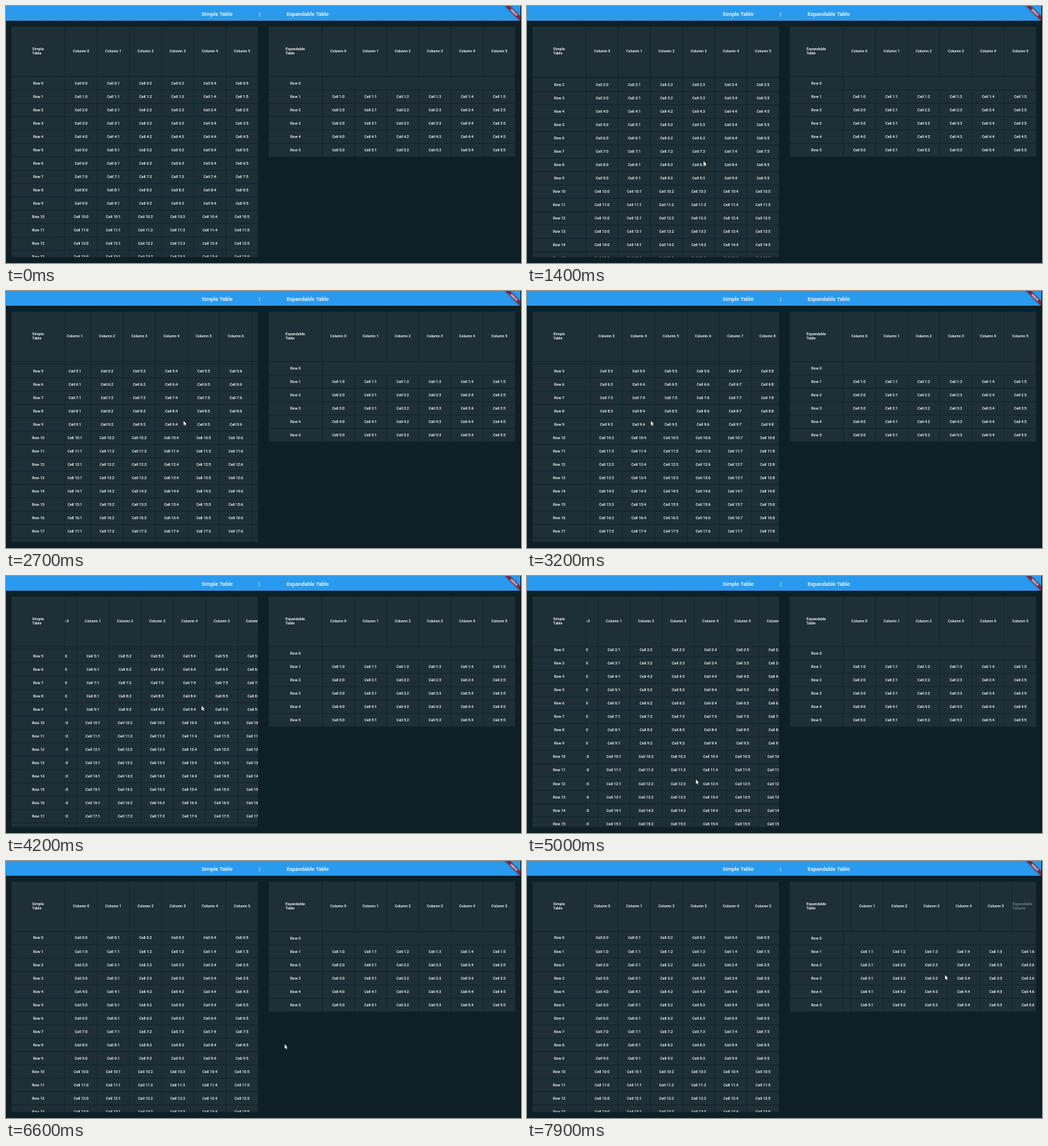
Write an HTML page with a canvas that moves like this. It is 732 by 366 pixels and loops after 8000 ms.

```html
<!DOCTYPE html>
<html lang="en">
<head>
<meta charset="utf-8">
<title>Simple and expandable tables</title>
<style>
  html, body { margin: 0; width: 100%; height: 100%; overflow: hidden; background: #0d2026; }
  canvas { display: block; width: 732px; height: 366px; }
</style>
</head>
<body>
<canvas id="stage" width="732" height="366"></canvas>
<script>
const ctx = document.getElementById('stage').getContext('2d');

// The layout uses a 1920 x 960 space scaled down to the stage.
const SCALE = 732 / 1920;
const WIDTH = 1918, BAR_H = 55.1;
const LOOP = 8000, STEP = 100;
const TOP = 76, HEADER_H = 188, FIRST_W = 200, COL_W = 120, ROW_H = 49.9;
const BODY_TOP = TOP + HEADER_H, HEADER_MID = TOP + HEADER_H / 2 - 1;
const GAP_X = 0.5, GAP_Y = 0.9;
const CELL = '#1e2f36', BACK = '#0d2026', BLUE = '#2a9aee';
const ARROW = new Path2D('M0 0V6.2L1.5 4.9 2.5 7.2 3.5 6.8 2.5 4.6 4.4 4.5Z');

// Pointer moves in stage pixels; a move that grabs a table scrolls it.
const HOME = { x: 251, y: 257 };
const MOVES = [
  { from: 400, to: 1400, y: 221, grab: 'left' },
  { from: 1400, to: 1800, x: 307, y: 240.5 },
  { from: 1800, to: 2300, y: 185, grab: 'left' },
  { from: 2300, to: 3200, x: 176, grab: 'left' },
  { from: 3600, to: 4200, x: 278, grab: 'left' },
  { from: 4200, to: 4450, x: 240, y: 241 },
  { from: 4450, to: 5500, y: 332, grab: 'left' },
  { from: 5500, to: 5700, x: 269, grab: 'left' },
  { from: 5700, to: 6500, x: 396, y: 261 },
  { from: 6700, to: 7400, x: 629, y: 162.5 },
  { from: 7500, to: 7900, x: 594.2, grab: 'right' }
];

function ease(t, from, to) {
  const k = Math.min(1, Math.max(0, (t - from) / (to - from)));
  return k * k * (3 - 2 * k);
}

function poseAt(t) {
  let { x, y } = HOME;
  const scroll = { left: { x: 0, y: 0 }, right: { x: 0, y: 0 } };
  for (const move of MOVES) {
    const k = ease(t, move.from, move.to);
    const dx = ((move.x ?? x) - x) * k, dy = ((move.y ?? y) - y) * k;
    x += dx;
    y += dy;
    if (move.grab) {
      scroll[move.grab].x -= dx / SCALE;
      scroll[move.grab].y -= dy / SCALE;
    }
    if (t < move.to) break;
  }
  return { x, y, scroll };
}

function text(str, x, y, { size = 14, align = 'center', color = '#fff', weight = 500 } = {}) {
  ctx.font = `${weight} ${size}px Roboto, sans-serif`;
  ctx.textAlign = align;
  ctx.fillStyle = color;
  ctx.fillText(str, x, y + size * 0.34);
}

function twoLines(first, second, x, color) {
  text(first, x, HEADER_MID - 8, { align: 'left', color });
  text(second, x, HEADER_MID + 8.5, { align: 'left', color });
}

function cell(x, y, w, h) {
  ctx.fillStyle = CELL;
  ctx.fillRect(x + GAP_X, y + GAP_Y, w - 2 * GAP_X, h - 2 * GAP_Y);
}

function labelCell(x, y, w, h, label) {
  cell(x, y, w, h);
  text(label, x + w / 2, y + h / 2);
}

function clipped(x, y, w, h, draw) {
  ctx.save();
  ctx.beginPath();
  ctx.rect(x, y, w, h);
  ctx.clip();
  draw();
  ctx.restore();
}

function drawTable({ x, w, bottom, rows, cols, title, titleX, scroll, expandable = false }) {
  const bodyX = x + FIRST_W, bodyW = w - FIRST_W, bodyH = bottom - BODY_TOP;
  const colX = c => bodyX + c * COL_W - scroll.x;
  const rowY = r => BODY_TOP + r * ROW_H - scroll.y;

  cell(x, TOP, FIRST_W, HEADER_H);
  twoLines(title, 'Table', titleX);

  clipped(bodyX, TOP, bodyW, HEADER_H, () => {
    for (let c = 0; c < cols; c++) {
      cell(colX(c), TOP, COL_W, HEADER_H);
      if (expandable && c === cols - 1) twoLines('Expandable', 'Column', colX(c) + 3, '#7c888d');
      else text('Column ' + c, colX(c) + COL_W / 2, HEADER_MID);
    }
  });

  clipped(x, BODY_TOP, FIRST_W, bodyH, () => {
    for (let r = 0; r < rows; r++) labelCell(x, rowY(r), FIRST_W, ROW_H, 'Row ' + r);
  });

  clipped(bodyX, BODY_TOP, bodyW, bodyH, () => {
    for (let r = 0; r < rows; r++) {
      if (expandable && r === 0) {
        cell(bodyX, rowY(r), bodyW, ROW_H);
        continue;
      }
      for (let c = 0; c < cols; c++) labelCell(colX(c), rowY(r), COL_W, ROW_H, `Cell ${r}:${c}`);
    }
  });
}

function drawAppBar() {
  const shadow = ctx.createLinearGradient(0, BAR_H, 0, BAR_H + 9);
  shadow.addColorStop(0, 'rgba(0,0,0,.25)');
  shadow.addColorStop(1, 'rgba(0,0,0,0)');
  ctx.fillStyle = shadow;
  ctx.fillRect(0, BAR_H, WIDTH, 9);
  ctx.fillStyle = BLUE;
  ctx.fillRect(0, 0, WIDTH, BAR_H);
  text('Simple Table', 787, 29, { size: 20 });
  text('|', 945, 29, { size: 20 });
  text('Expandable Table', 1125, 29, { size: 20 });
}

function drawRibbon() {
  clipped(0, 0, WIDTH, 960, () => {
    ctx.translate(WIDTH, 0);
    ctx.rotate(Math.PI / 4);
    ctx.shadowColor = 'rgba(0,0,0,.5)';
    ctx.shadowBlur = 3;
    ctx.fillStyle = 'rgba(150,24,48,.85)';
    ctx.fillRect(-50, 28, 100, 12);
    ctx.shadowColor = 'transparent';
    text('DEBUG', 0, 34, { size: 10.2, weight: 900 });
  });
}

function drawPointer(x, y) {
  ctx.setTransform(1, 0, 0, 1, x, y);
  ctx.lineWidth = 0.8;
  ctx.strokeStyle = '#0a1216';
  ctx.stroke(ARROW);
  ctx.fillStyle = '#fff';
  ctx.fill(ARROW);
}

function draw(t) {
  const { x, y, scroll } = poseAt(t);
  ctx.setTransform(SCALE, 0, 0, SCALE, 0, 0);
  ctx.fillStyle = BACK;
  ctx.fillRect(0, 0, 1920, 960);

  drawTable({
    x: 20, w: 919, bottom: 938, rows: 26, cols: 12,
    title: 'Simple', titleX: 98, scroll: scroll.left
  });
  drawTable({
    x: 979, w: 919, bottom: 564, rows: 6, cols: 7,
    title: 'Expandable', titleX: 1042, scroll: scroll.right, expandable: true
  });
  drawAppBar();
  drawRibbon();
  ctx.fillStyle = '#071114';
  ctx.fillRect(WIDTH, 0, 2, 960);

  if (t >= MOVES[0].from) drawPointer(x, y);
}

const start = performance.now();
function tick() {
  const t = (performance.now() - start) % LOOP;
  draw(Math.floor(t / STEP) * STEP);
  requestAnimationFrame(tick);
}
tick();
</script>
</body>
</html>
```
